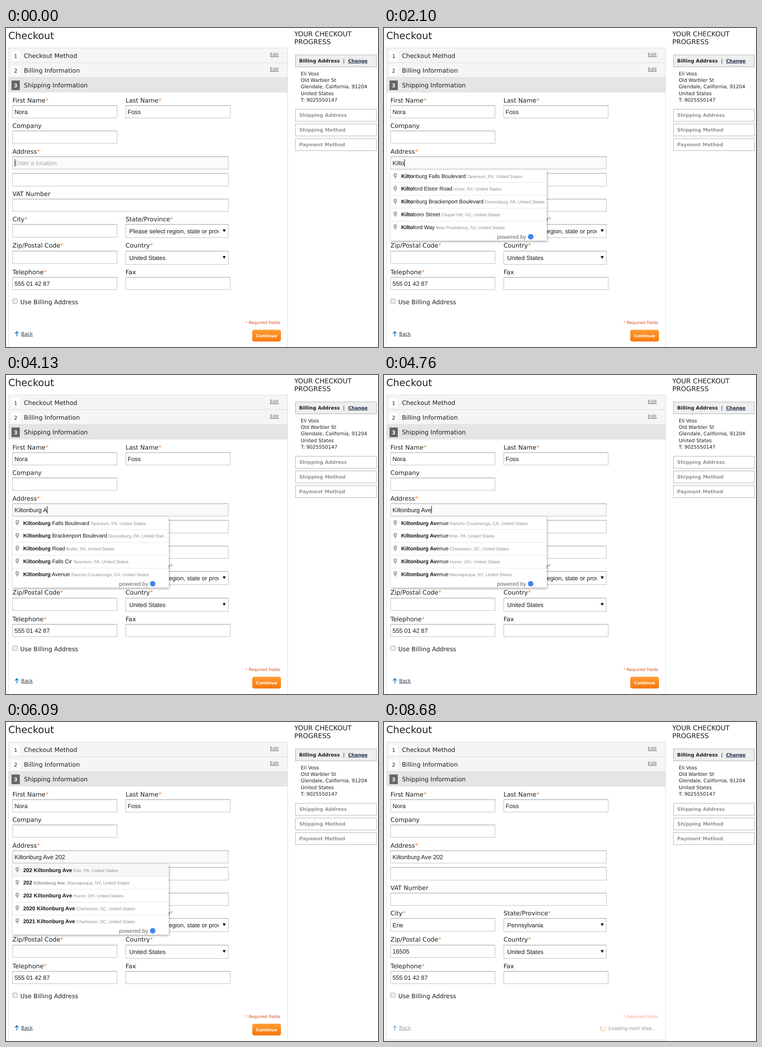
Write an HTML page that moves like this. It is 809x693 px and loops after 8750 ms.

```html
<!DOCTYPE html>
<html lang="en">
<head>
<meta charset="utf-8">
<title>Checkout</title>
<style>
html, body { margin: 0; width: 100%; height: 100%; overflow: hidden; background: #fff; }
svg { display: block; width: 809px; height: 693px; }
text { font-family: "DejaVu Sans", sans-serif; white-space: pre; text-rendering: geometricPrecision; }
.arial { font-family: "Liberation Sans", Arial, sans-serif; }
.bold { font-weight: bold; }
.link { text-decoration: underline; }
</style>
</head>
<body>
<svg id="stage" viewBox="0 0 809 693">
  <defs>
    <linearGradient id="orange" x2="0" y2="1">
      <stop offset="0" stop-color="#ff9c35"/><stop offset="1" stop-color="#f5780b"/>
    </linearGradient>
    <clipPath id="selectClip"><rect x="262" y="428" width="201" height="26"/></clipPath>
  </defs>
  <g id="page"></g>
  <g id="address"></g>
  <g id="filled"></g>
  <g id="menu"></g>
  <g id="footer"></g>
</svg>
<script>
const $ = id => document.getElementById(id);
const LOOP = 8750;

const text = (x, y, size, str, fill = '#1e1e1e', cls = '', more = '') =>
  `<text x="${x}" y="${y}" font-size="${size}" class="${cls}" fill="${fill}" ${more}>${str}</text>`;
const rect = (x, y, w, h, fill, more = '') =>
  `<rect x="${x}" y="${y}" width="${w}" height="${h}" fill="${fill}" ${more}/>`;
const frame = (x, y, w, h, fill, line) =>
  rect(x + .5, y + .5, w - 1, h - 1, fill, `stroke="${line}"`);
const value = (x, y, str, fill = '#1a1a1a', more = '') => text(x, y, 13.15, str, fill, 'arial', more);
const label = (x, y, str, star) =>
  text(x, y, 13.35, str + (star ? '<tspan fill="#ef8535">*</tspan>' : ''));
const field = (x, y, w, h = 28, fill = '#fff') =>
  frame(x, y, w, h, fill, '#bdbdbd') + rect(x, y, w, 1, '#a6a6a6') + rect(x + 1, y + 1, w - 2, 1, '#ececec');
const select = y =>
  field(260, y, 224, 30) + `<path d="M471 ${y + 11.5}h7l-3.5 6z" fill="#111"/>`;

function drawPage() {
  const steps = ['Checkout Method', 'Billing Information', 'Shipping Information'];
  let s = text(5, 23.5, 21.3, 'Checkout') + rect(5, 43, 608, 660, '#ddd') + rect(6, 140, 606, 553, '#fff');
  steps.forEach((name, i) => {
    const y = 44 + i * 32, on = i === 2;
    s += rect(6, y, 606, 31 + on, on ? '#e5e5e5' : '#f5f5f5')
      + rect(12, y + 6, 18, 21, on ? '#666' : '#fff')
      + text(21, y + 20.5, 11.3, i + 1, on ? '#fff' : '#222', on ? 'bold' : '', 'text-anchor="middle"')
      + text(39, y + 20.5, 13.25, name)
      + (on ? '' : text(574, y + 17, 9.9, 'Edit', '#666', 'link'));
  });

  s += label(14, 161.5, 'First Name', 1) + field(14, 168, 228) + value(18.5, 187, 'Nora')
    + label(260, 161.5, 'Last Name', 1) + field(260, 168, 228) + value(264.5, 187, 'Foss')
    + label(14, 217, 'Company') + field(14, 223, 228)
    + label(14, 272.5, 'Address', 1) + field(14, 315, 470, 29)
    + label(14, 364.5, 'VAT Number') + field(14, 371, 470)
    + label(14, 420, 'City', 1) + field(14, 426, 228, 29)
    + label(260, 420, 'State/Province', 1) + select(426)
    + label(14, 477, 'Zip/Postal Code', 1) + field(14, 484, 228)
    + label(260, 477, 'Country', 1) + select(484) + value(268, 503.5, 'United States')
    + label(14, 534.5, 'Telephone', 1) + field(14, 541, 228) + value(18.5, 560, '555 01 42 87')
    + label(260, 534.5, 'Fax') + field(260, 541, 228)
    + rect(14.5, 588.5, 10, 10, '#eee', 'rx="1.5" stroke="#aaa"') + text(31, 599.5, 13.2, 'Use Billing Address');

  s += text(627, 18, 14.5, 'YOUR CHECKOUT') + text(627, 35, 14.5, 'PROGRESS')
    + frame(629, 58, 177, 27, '#eee', '#a9b2b8')
    + text(637.5, 75, 10.45, 'Billing Address', '#222', 'bold') + text(733, 75, 10.4, '|')
    + text(744, 75, 10, 'Change', '#1e2e48', 'bold link');
  ['Eli Voss', 'Old Warbler St', 'Glendale, California, 91204', 'United States', 'T: 9025550147']
    .forEach((line, i) => s += text(641, 102.5 + i * 14.4, 10.6, line));
  ['Shipping Address', 'Shipping Method', 'Payment Method'].forEach((name, i) =>
    s += frame(629, 176 + i * 32, 177, 27, '#fff', '#a9b2b8')
      + text(637.5, 193 + i * 32, 10.5, name, '#959595', 'bold'));
  $('page').innerHTML = s;
}

// Each suggestion is "street|place"; the country is added when drawn.
const lists = [
  ['Kelnomerlina Avenue Northwest|Washington, DC', 'Kast Avenue|Bronx, NY', 'Kelnomerlina Plaza|New York, NY',
    'Kovenbelt Street Northeast|Atlanta, GA', 'Kelodine Road|Las Vegas, NV'],
  ['Kinmorel Avenue|Brooklyn, NY', 'Kiverdale Boulevard|Los Angeles, CA', 'Kilborrow Street|Houston, TX',
    'Kistelmoor Road Northeast|Atlanta, GA', 'Kiltonburg Falls Boulevard|Tarentum, PA'],
  ['Kiltonburg Falls Boulevard|Tarentum, PA', 'Kiltoford Elstor Road|Victor, NY',
    'Kiltonburg Brackenport Boulevard|Dravosburg, PA', 'Kiltoboro Street|Chapel Hill, NC', 'Kiltoford Way|New Providence, NJ'],
  ['Kiltonburg Falls Boulevard|Tarentum, PA', 'Kiltonburg Brackenport Boulevard|Dravosburg, PA',
    'Kiltonburg Road|Butler, PA', 'Kiltonburg Falls Cir|Tarentum, PA', 'Kiltonburg Avenue|Rancho Cucamonga, CA'],
  ['Kiltonburg Avenue|Rancho Cucamonga, CA', 'Kiltonburg Avenue|Erie, PA', 'Kiltonburg Avenue|Charleston, SC',
    'Kiltonburg Avenue|Huron, OH', 'Kiltonburg Avenue|Massapequa, NY'],
  ['2 Kiltonburg Ave|Erie, PA', '2|Kiltonburg Ave, Massapequa, NY', '2 Kiltonburg Ave|Huron, OH',
    '2|Kiltonburg Ave, Mechanicville, NY', '2 Kiltonburg Ave|Charleston, SC'],
  ['20|Kiltonburg Ave, Mechanicville, NY', '20|Kiltonburg Ave, Massapequa, NY', '200 Kiltonburg Ave|Erie, PA',
    '204 Kiltonburg Ave|Huron, OH', '2000 Kiltonburg Ave|Charleston, SC'],
  ['202 Kiltonburg Ave|Erie, PA', '202|Kiltonburg Ave, Massapequa, NY', '202 Kiltonburg Ave|Huron, OH',
    '2020 Kiltonburg Ave|Charleston, SC', '2021 Kiltonburg Ave|Charleston, SC']
];

// time, letters typed, list shown, bold letters
const street = 'Kiltonburg Ave 202';
const typing = [
  [0, 0], [770, 1], [1050, 2, 0, 1], [1330, 3, 0, 1], [1400, 3, 1, 2], [1540, 4, 1, 2], [1610, 4, 2, 3],
  [1890, 5, 2, 4], [2100, 5, 2, 5], [2240, 6, 2, 5], [2380, 6, 3, 6], [2520, 7, 3, 6], [2660, 7, 3, 7],
  [2940, 8, 3, 7], [3080, 8, 3, 8], [3290, 9, 3, 8], [3430, 10, 3, 9], [3570, 11, 3, 10],
  [4130, 12, 3, 10], [4270, 12, 4, 12], [4410, 13, 4, 12], [4550, 13, 4, 13], [4690, 14, 4, 13],
  [4830, 14, 4, 14], [4900, 15, 4, 14], [5040, 16, 4, 14], [5180, 17, 5, 99], [5320, 17, 6, 99],
  [5390, 18, 6, 99], [5530, 18, 7, 99], [6440, 18]
];

function row(item, i, bold) {
  const y = 308 + i * 27.75;
  let [main, place] = item.split('|');
  place += ', United States';
  if (main.includes('Brackenport') && bold > 5) place = place.replace('States', 'Stat…');
  place = place.replace('Kiltonburg Ave,', '<tspan class="bold">Kiltonburg Ave</tspan>,');
  return (i ? rect(14, Math.round(y - .5), 340, 1, '#e6e6e6') : '')
    + `<path transform="translate(24.5 ${y + 7})" fill="#aaa" fill-rule="evenodd"
        d="M0 13.5C-.8 9-4 7.5-4 4.2a4 4 0 0 1 8 0C4 7.5.8 9 0 13.5zM-1.5 4.2a1.5 1.5 0 1 0 3 0a1.5 1.5 0 1 0-3 0z"/>`
    + text(37.5, y + 17.5, 11.75, `<tspan class="bold">${main.slice(0, bold)}</tspan>${main.slice(bold)}`
      + `<tspan dx="2.8" font-size="9.6" fill="#909090">${place}</tspan>`, '#12121c', 'arial');
}

function drawMenu(list, bold, hover) {
  if (list === undefined) return '';
  return rect(14, 308, 340, 154, '#fff', 'style="filter:drop-shadow(1px 2px 2.5px rgba(0,0,0,.35))"')
    + (hover ? rect(14, 308, 340, 27, '#f7f7f7') : '')
    + lists[list].map((item, i) => row(item, i, bold)).join('')
    + text(246, 457.5, 12.2, 'powered by', '#666', 'arial')
    + '<circle cx="319" cy="453.5" r="6" fill="#4285f4"/>';
}

function drawAddress(count, caret, blurred) {
  $('address').innerHTML = field(14, 279, 470, 28, blurred ? '#fff' : '#fafafa')
    + (count ? value(18.5, 298, street.slice(0, count), '#1a1a1a', 'id="typed"')
      : value(19, 298, 'Enter a location', '#a9a9a9'));
  if (!caret) return;
  const end = count ? $('typed').getComputedTextLength() : 0;
  $('address').innerHTML += rect(Math.round(18.5 + end), 285, 1, 16, '#000');
}

const drawFilled = done => done
  ? value(18.5, 445.5, 'Erie') + value(18.5, 502.5, '16505') + value(268, 446, 'Pennsylvania')
  : value(268, 446, 'Please select region, state or province', '#1a1a1a', 'clip-path="url(#selectClip)"');

function drawFooter(loading, turn) {
  let s = `<g opacity="${loading ? .5 : 1}">`
    + text(520.5, 643, 9, `<tspan fill="${loading ? '#eb340a' : '#ef8020'}">*</tspan> Required Fields`,
      loading ? '#f0400f' : '#d4461a')
    + '<path d="M23.5 670v-10M19.5 664l4-4.5l4 4.5" fill="none" stroke="#1874b8" stroke-width="1.6"/>'
    + text(33, 668, 10.4, 'Back', '#2b3a48', 'link') + '</g>';
  if (!loading)
    return s + rect(535.5, 655.5, 62.5, 25.5, 'url(#orange)', 'rx="4.5"')
      + text(566.5, 671.5, 9.1, 'Continue', '#fff', 'bold', 'text-anchor="middle"');
  for (let i = 0; i < 12; i++)
    s += `<path d="M0-6.5v3" transform="translate(476.5 666) rotate(${(i + turn) * 30})"
      stroke="#f58a1f" stroke-width="1.5" opacity="${.12 + i * .06}"/>`;
  return s + text(488, 669, 10.55, 'Loading next step...', '#8c9297')
    + rect(5, 690, 608, 1, '#ddd') + rect(6, 691, 606, 2, '#f5f5f5');
}

let last = '';
function tick(now) {
  const t = now % LOOP;
  const step = typing.findLastIndex(s => s[0] <= t);
  const [, count, list, bold] = typing[step];
  const caret = t < 140 || (t >= 630 && t < 5950) || (t >= 6440 && t < 7350);
  const hover = t >= 6090, done = t >= 6510, loading = t >= 7700;
  const turn = loading ? Math.floor((t - 7700) / 88) : 0;
  const key = [step, caret, hover, done, loading, turn].join();
  if (key !== last) {
    last = key;
    drawAddress(count, caret, loading);
    $('filled').innerHTML = drawFilled(done);
    $('menu').innerHTML = drawMenu(list, bold, hover);
    $('footer').innerHTML = drawFooter(loading, turn);
  }
  requestAnimationFrame(tick);
}

drawPage();
tick(0);
</script>
</body>
</html>
```
